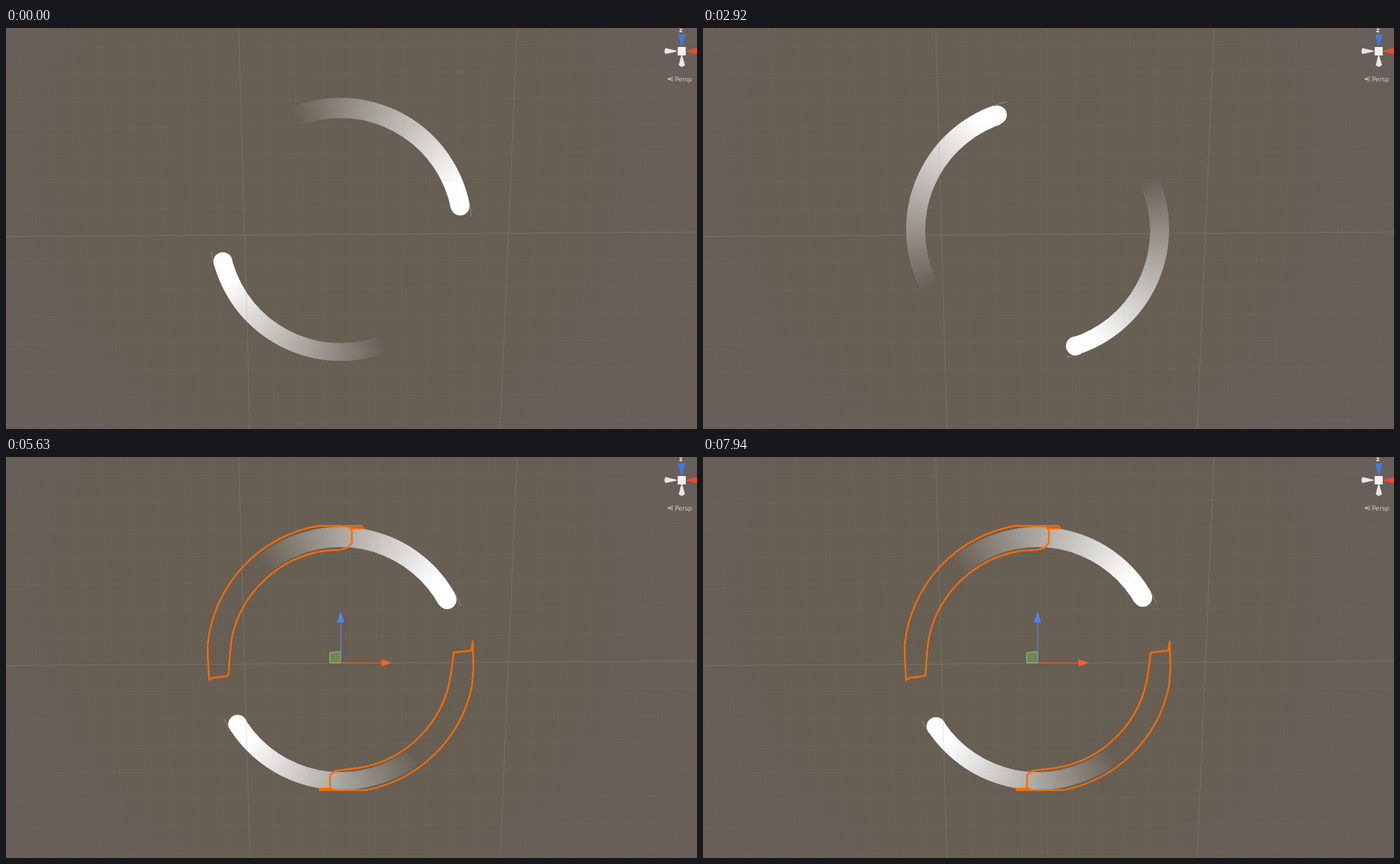
Animation of 983 by 570 pixels, one loop 8 s. Source, as an HTML page with a canvas:

```html
<!DOCTYPE html>
<html lang="en">
<head>
<meta charset="utf-8">
<title>Spinner in scene view</title>
<style>
  html, body { margin: 0; width: 100%; height: 100%; overflow: hidden; background: #685f55; }
  canvas { display: block; }
</style>
</head>
<body>
<canvas id="stage" width="983" height="570"></canvas>
<script>
const ctx = document.getElementById('stage').getContext('2d');
const W = 983, H = 570, LOOP = 8000, RAD = Math.PI / 180;

// The ring lies on a slightly tilted plane: its pivot is seen below the middle of its outline.
const MID = { x: 476, y: 286.3 }, RADIUS = 187, TILT = 0.035;
const PIVOT = { x: MID.x, y: MID.y + RADIUS * TILT };
const ARC = 98, FADE = 88;

const OUTLINES = [
  'M489 101.5H508L506 98H443A191 191 0 0 0 287 266V283L289 317L294 314L314 311.5Q317 311 317 303' +
  'Q318 280 321 258A159 159 0 0 1 455 133L475 132L486 129L492 122V102',
  'M664 262L665 300L663 325A190 190 0 0 1 512 473.5H446V471.5H464M461 471V452L469 446L502 442' +
  'A158 158 0 0 0 633 308L637 278L662 275L664 262'
].map(d => new Path2D(d));

function project(r, deg) {
  const x = r * Math.cos(deg * RAD), y = r * Math.sin(deg * RAD), depth = 1 + TILT * y;
  return [MID.x + RADIUS * x / depth, MID.y + RADIUS * (y + TILT) / depth];
}

function line(color, width, ...points) {
  ctx.beginPath();
  points.forEach(p => ctx.lineTo(...p));
  ctx.strokeStyle = color;
  ctx.lineWidth = width;
  ctx.stroke();
}

function shape(color, ...points) {
  ctx.beginPath();
  points.forEach(p => ctx.lineTo(...p));
  ctx.closePath();
  ctx.fillStyle = color;
  ctx.fill();
}

function drawBackground() {
  const tint = ctx.createRadialGradient(460, 200, 390, 460, 200, 500);
  tint.addColorStop(0, '#675f54');
  tint.addColorStop(1, '#685f5a');
  ctx.fillStyle = tint;
  ctx.fillRect(0, 0, W, H);
}

function drawGrid() {
  const minor = 'rgba(150,145,140,.07)', major = 'rgba(160,154,146,.32)';
  for (let i = -10; i <= 18; i++)
    line(i % 10 ? minor : major, 1, [331 + 39.6 * i, 0], [347 + 35.6 * i, H]);
  for (let j = -7; j <= 7; j++)
    line(j ? minor : major, 1, [0, 296.5 + 38.3 * j], [W, 290 + 38.3 * j]);
}

function drawRing(head) {
  const fade = ctx.createConicGradient((head - ARC) * RAD, PIVOT.x, PIVOT.y);
  for (const start of [0, 180]) {
    const stop = (deg, alpha) => fade.addColorStop((start + deg) / 360, `rgba(255,255,255,${alpha})`);
    stop(0, 0);
    stop(FADE, 1);
    stop(ARC, 1);
    stop(ARC, 0);
    stop(180, 0);
  }
  ctx.filter = 'blur(0.7px)';
  ctx.beginPath();
  ctx.arc(MID.x, MID.y, RADIUS, 0, 7);
  ctx.closePath();
  ctx.moveTo(MID.x + 160, 288);
  ctx.arc(MID.x, 288, 160, 0, 7);
  ctx.fillStyle = fade;
  ctx.fill('evenodd');

  for (const angle of [head, head + 180]) {
    ctx.beginPath();
    ctx.arc(...project(0.927, angle), 13.4, 0, 7);
    ctx.fillStyle = '#fff';
    ctx.fill();
  }
  ctx.filter = 'none';
  for (const angle of [head, head + 180])
    line('rgba(205,200,194,.45)', 1, ...[0, 2, 4, 5.5].map(d => project(0.998, angle + d)));
}

function drawSelection() {
  ctx.lineJoin = ctx.lineCap = 'round';
  ctx.strokeStyle = '#ff6a00';
  ctx.lineWidth = 2.4;
  OUTLINES.forEach(path => ctx.stroke(path));
  ctx.lineJoin = 'miter';
  ctx.lineCap = 'butt';

  const plane = [[460.5, 278], [476, 276.5], [476, 292.5], [460.5, 292.5]];
  shape('#738553', ...plane);
  line('#9cc07c', 1, ...plane, plane[0]);
  line('#5b84dc', 1.2, [476.3, 292], [476.3, 234]);
  shape('#4f86ec', [471, 235], [476, 219.5], [481, 235]);
  line('#e2622c', 1.2, [476, 292.5], [535, 292.5]);
  shape('#f0642a', [534, 287.5], [549.5, 292.5], [534, 297.5]);
}

function drawCompass() {
  shape('#4478d8', [956, 9], [966.5, 9], [962, 26], [960.5, 26]);
  shape('#e8e6e4', [938, 28.5], [954, 32.3], [954, 33.5], [938, 37], [936.5, 33]);
  shape('#f04a26', [968, 32.5], [983, 28], [983, 37.5], [968, 33.5]);
  shape('#e8e6e4', [960.5, 39], [962, 39], [966, 53], [961, 55.5], [957, 53]);
  ctx.fillStyle = '#f2f1f0';
  ctx.fillRect(955.5, 27, 11.5, 12);

  ctx.font = 'bold 9px "DejaVu Sans", sans-serif';
  ctx.fillText('z', 957.5, 6);
  ctx.font = '9px "DejaVu Sans", sans-serif';
  ctx.fillStyle = '#d0ccc7';
  ctx.fillText('Persp', 951.5, 76);
  for (const y of [69.5, 72.5, 75.5]) line('#c4bfb9', 1, [941, 72.5], [949, y]);
}

// The picture advances in steps of 77 ms; close to the end the rotation jumps.
function headAngle(t) {
  const step = Math.floor((t + 22) / 77);
  return step < 102 ? -13.2 + 2.225 * step : 148 + 2.225 * (step - 103);
}

function render() {
  const t = performance.now() % LOOP;
  const selected = (t >= 450 && t < 2140) || t >= 3660;
  drawBackground();
  drawRing(headAngle(t));
  drawGrid();
  if (selected) drawSelection();
  drawCompass();
  requestAnimationFrame(render);
}
render();
</script>
</body>
</html>
```
